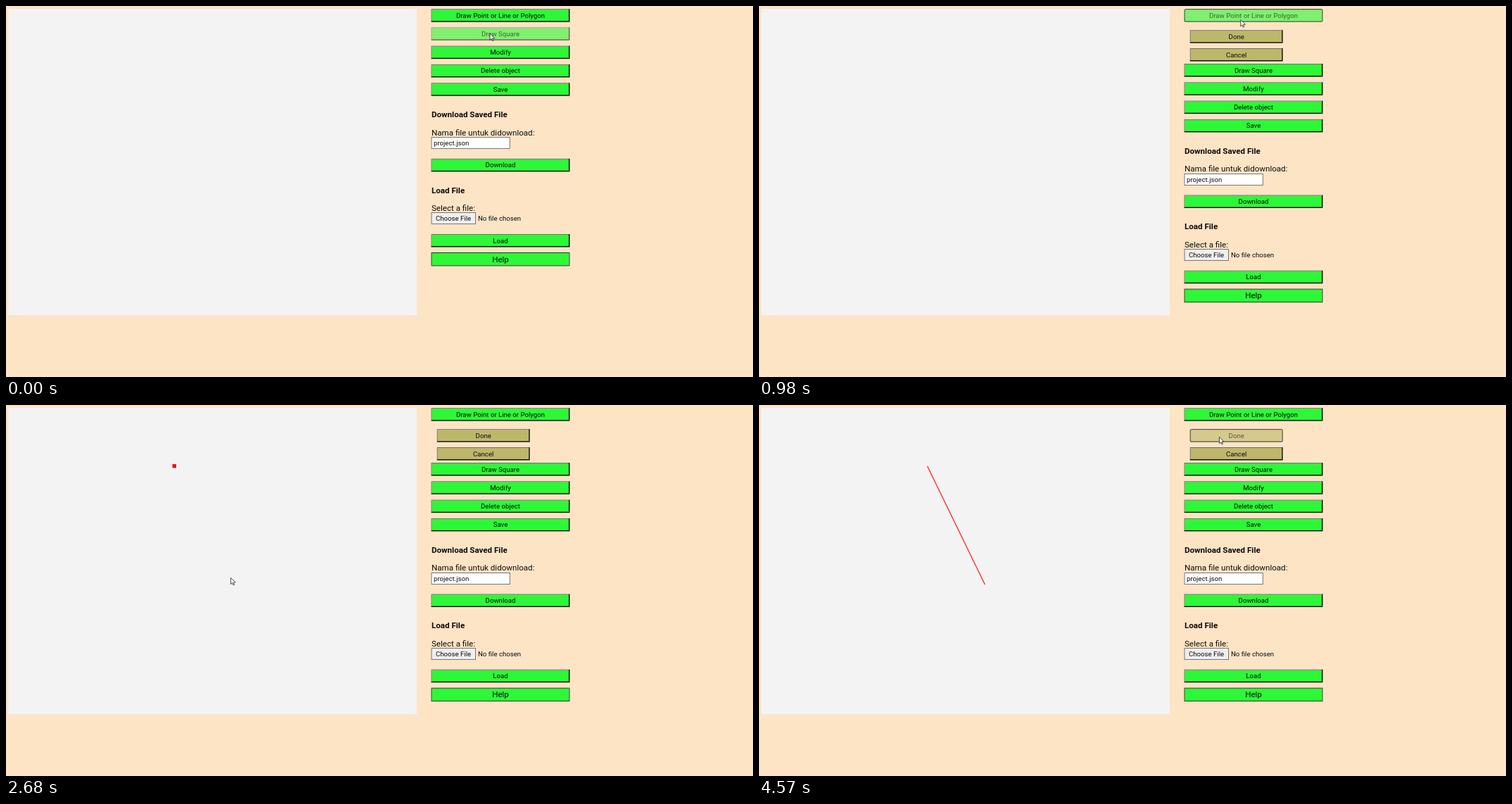
An HTML page with a canvas for the animation above (5350 ms loop, 1062 by 527 pixels).

```html
<!DOCTYPE html>
<html lang="id">
<head>
<meta charset="utf-8">
<title>Drawing tool</title>
<style>
html, body { margin: 0; width: 100%; height: 100%; overflow: hidden; background: #fde4c5; }
canvas { display: block; }
</style>
</head>
<body>
<canvas id="stage" width="1062" height="527"></canvas>
<script>
const ctx = document.getElementById('stage').getContext('2d');
const LOOP = 5350;
const SMALL = 9.65, NORMAL = 11.58;
const GREEN = '#2cf837', KHAKI = '#bdb76b', RED = '#f01212';
const OPEN_AT = 980, LINE_AT = 4570, PANEL_SHIFT = 51.7;
const START = [687.6, 38.8];

// Pointer moves: first step, last step, number of steps, end point
const moves = [
  [70, 520, 7, 684.4, 19.2],
  [1130, 1590, 7, 240, 87],
  [2220, 2680, 7, 319.2, 245],
  [2760, 2910, 3, 321.2, 254.6],
  [3380, 3850, 7, 588, 79],
  [3930, 3930, 1, 632, 56],
  [4020, 4020, 1, 653.2, 46.4],
  [4100, 4170, 2, 654, 45]
];
const clicks = [[900, 980], [2060, 2220], [3230, 3380], [4340, 4570]];
const points = [[239.3, 86.7, 2060], [321.2, 255, 3230]];

const ease = p => p * p * (3 - 2 * p);

function pointerAt(t) {
  let [x, y] = START;
  for (const [from, to, steps, endX, endY] of moves) {
    if (t < from) break;
    const gap = steps > 1 ? (to - from) / (steps - 1) : 1;
    const step = Math.min(steps, Math.floor((t - from) / gap + 0.01) + 1);
    const p = ease(step / steps);
    x += (endX - x) * p;
    y += (endY - y) * p;
  }
  return [x, y];
}

function text(str, x, y, size = NORMAL, weight = 400, align = 'left') {
  ctx.font = `${weight} ${size}px Roboto, sans-serif`;
  ctx.textAlign = align;
  ctx.fillStyle = '#0c0c0c';
  ctx.fillText(str, x, y);
}

function rect(color, x, y, w, h) {
  ctx.fillStyle = color;
  ctx.fillRect(x, y, w, h);
}

function frame(color, fill, x, y, w, h) {
  rect(color, x, y, w, h);
  rect(fill, x + 1, y + 1, w - 2, h - 2);
}

function button(label, y, pointer, opt = {}) {
  const { x = 604.5, w = 197, h = 18.5, fill = GREEN, size = SMALL, flat, focus } = opt;
  const [px, py] = pointer;
  const hover = px >= x && px <= x + w && py >= y && py <= y + h;
  ctx.save();
  ctx.globalAlpha = hover ? 0.6 : 1;
  if (focus) {
    ctx.beginPath();
    ctx.roundRect(x + 0.5, y + 0.5, w - 1, h - 1, 2);
    ctx.fillStyle = fill;
    ctx.fill();
    ctx.lineWidth = hover ? 1.2 : 1.8;
    ctx.strokeStyle = '#000';
    ctx.stroke();
  } else {
    const edge = flat ? 1 : 1.5;
    rect(fill, x + 1, y + 1, w - 1 - edge, h - 1 - edge);
    const light = flat ? '#173a17' : '#6c706a';
    rect(light, x, y, w - edge, 1);
    rect(light, x, y + 1, 1, h - 1 - edge);
    const dark = flat ? light : '#0a140a';
    rect(dark, x, y + h - edge, w, edge);
    rect(dark, x + w - edge, y, edge, h - edge);
  }
  text(label, x + w / 2, y + h / 2 + size * 0.342, size, 400, 'center');
  ctx.restore();
}

function panel(t, pointer) {
  button('Draw Point or Line or Polygon', 4.2, pointer, { focus: t >= 900 && t < 2060 });
  const open = t >= OPEN_AT;
  if (open) {
    const sub = { x: 612.7, w: 132, fill: KHAKI };
    button('Done', 34.2, pointer, { ...sub, focus: t >= 4340 });
    button('Cancel', 60, pointer, sub);
  }
  const dy = open ? PANEL_SHIFT : 0;
  ['Draw Square', 'Modify', 'Delete object', 'Save'].forEach((label, i) =>
    button(label, 30.3 + i * 26.3 + dy, pointer));
  button('Download', 216.8 + dy, pointer);
  button('Load', 324 + dy, pointer);
  button('Help', 350 + dy, pointer, { h: 19.4, size: NORMAL, flat: true });

  const top = Math.round(dy);
  text('Download Saved File', 605, 158 + dy, NORMAL, 700);
  text('Nama file untuk didownload:', 605, 183.6 + dy);
  frame('#767676', '#fff', 604.5, 186 + top, 112.3, 17);
  text('project.json', 608, 198 + dy, SMALL);
  text('Load File', 605, 265.5 + dy, NORMAL, 700);
  text('Select a file:', 605, 290.9 + dy);
  frame('#767676', '#efefef', 604.5, 293 + top, 63.5, 17);
  text('Choose File', 611, 304.8 + dy, SMALL);
  text('No file chosen', 671, 304.8 + dy, SMALL);
}

function drawing(t) {
  rect('#f3f3f3', 3.4, 4, 580.6, 435.2);
  if (t >= LINE_AT) {
    const [a, b] = points;
    ctx.beginPath();
    ctx.moveTo(a[0], a[1]);
    ctx.lineTo(b[0], b[1]);
    ctx.lineWidth = 1.4;
    ctx.strokeStyle = '#ff2a2a';
    ctx.stroke();
    return;
  }
  for (const [x, y, from] of points) {
    if (t >= from) rect(RED, x - 2.7, y - 2.7, 5.4, 5.4);
  }
}

function cursor(t, [x, y]) {
  if (clicks.some(([from, to]) => t >= from && t < to)) {
    ctx.beginPath();
    ctx.arc(x, y, 9, 0, Math.PI * 2);
    ctx.fillStyle = 'rgba(240, 225, 15, 0.65)';
    ctx.fill();
  }
  ctx.save();
  ctx.translate(x + 0.4, y + 0.4);
  ctx.scale(0.58, 0.58);
  ctx.beginPath();
  ctx.moveTo(0, 0);
  for (const [cx, cy] of [[0, 16], [3.7, 12.6], [6.2, 18.2], [8.6, 17.1], [6.2, 11.6], [11.4, 11.4]]) {
    ctx.lineTo(cx, cy);
  }
  ctx.closePath();
  ctx.fillStyle = '#fff';
  ctx.fill();
  ctx.lineWidth = 1.4;
  ctx.strokeStyle = '#222';
  ctx.stroke();
  ctx.restore();
}

function draw(t) {
  const pointer = pointerAt(t);
  rect('#fde4c5', 0, 0, 1062, 527);
  drawing(t);
  panel(t, pointer);
  cursor(t, pointer);
}

function tick() {
  draw(performance.now() % LOOP);
  requestAnimationFrame(tick);
}
tick();
</script>
</body>
</html>
```
